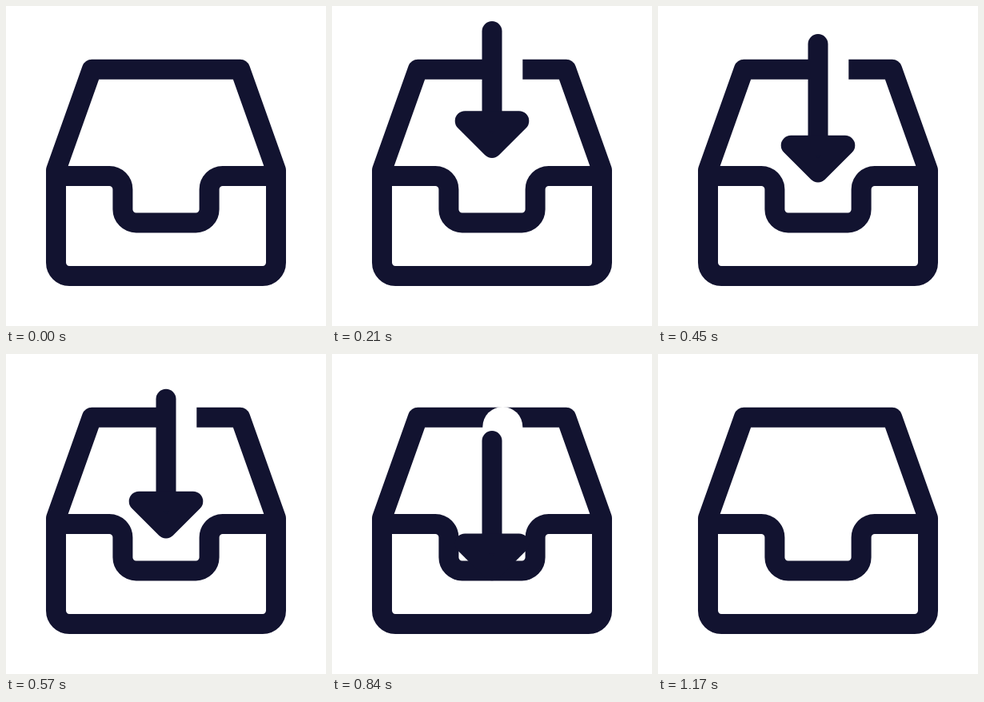
Animation of 400 by 400 pixels, one loop 2530 ms. Source, as an HTML page:

```html
<!DOCTYPE html>
<html lang="en">
<head>
<meta charset="utf-8">
<title>Inbox download</title>
<style>
  html, body { margin: 0; width: 100%; height: 100%; overflow: hidden; background: #fff; }
  svg { display: block; width: 100%; height: 100%; }
  .line { fill: none; stroke: #121330; stroke-width: 25; stroke-linejoin: round; }
  .gap { stroke: #fff; stroke-width: 50; stroke-linecap: round; }
  .head { fill: #121330; }
  .shaft { stroke-linecap: round; }
</style>
</head>
<body>
<svg viewBox="0 0 400 400">
  <clipPath id="floor"><rect width="400" height="283.7"/></clipPath>
  <path class="line" d="M62.5 205.2L107.3 79.2H292.7L337.5 205.2V320.8a16.7 16.7 0 0 1-16.7 16.7H79.2a16.7 16.7 0 0 1-16.7-16.7Z"/>
  <line id="gap" class="gap" x1="213.3" x2="213.3"/>
  <path class="line" d="M62.5 212.5H129.2a16.7 16.7 0 0 1 16.7 16.7V254.2a16.7 16.7 0 0 0 16.7 16.7H237.4a16.7 16.7 0 0 0 16.7-16.7V229.2a16.7 16.7 0 0 1 16.7-16.7H337.5"/>
  <g id="arrow" clip-path="url(#floor)">
    <line id="shaft" class="line shaft" x1="200" x2="200"/>
    <path id="head" class="line head" d="M166.2 12.5H233.8L200 46.3Z"/>
  </g>
</svg>
<script>
  const LOOP = 2530, STEP = 30, SHOW = 30, HIDE = 1020;
  const [gap, arrow, shaft, head] =
    ['gap', 'arrow', 'shaft', 'head'].map(id => document.getElementById(id));

  // Slow steady drift, then a steep drop into the tray.
  const topAt = t => 5 + t / 15 + 35 * (t / 840) ** 9.9;

  // Distance from the shaft's top to the head; it extends and settles.
  const reachAt = t => 128.5 - 110 * Math.exp(-t / 110);

  function draw(t) {
    const visible = t >= SHOW && t < HIDE;
    gap.style.display = arrow.style.display = visible ? '' : 'none';
    if (!visible) return;
    const top = topAt(t), headTop = top + reachAt(t);
    gap.setAttribute('y1', top - 5);
    gap.setAttribute('y2', Math.max(top - 5, 150));
    shaft.setAttribute('y1', top + 12.5);
    shaft.setAttribute('y2', headTop + 12.5);
    head.setAttribute('transform', `translate(0 ${headTop})`);
  }

  const start = performance.now();
  function tick() {
    const t = (performance.now() - start) % LOOP;
    draw(Math.floor(t / STEP) * STEP);
    requestAnimationFrame(tick);
  }
  tick();
</script>
</body>
</html>
```
